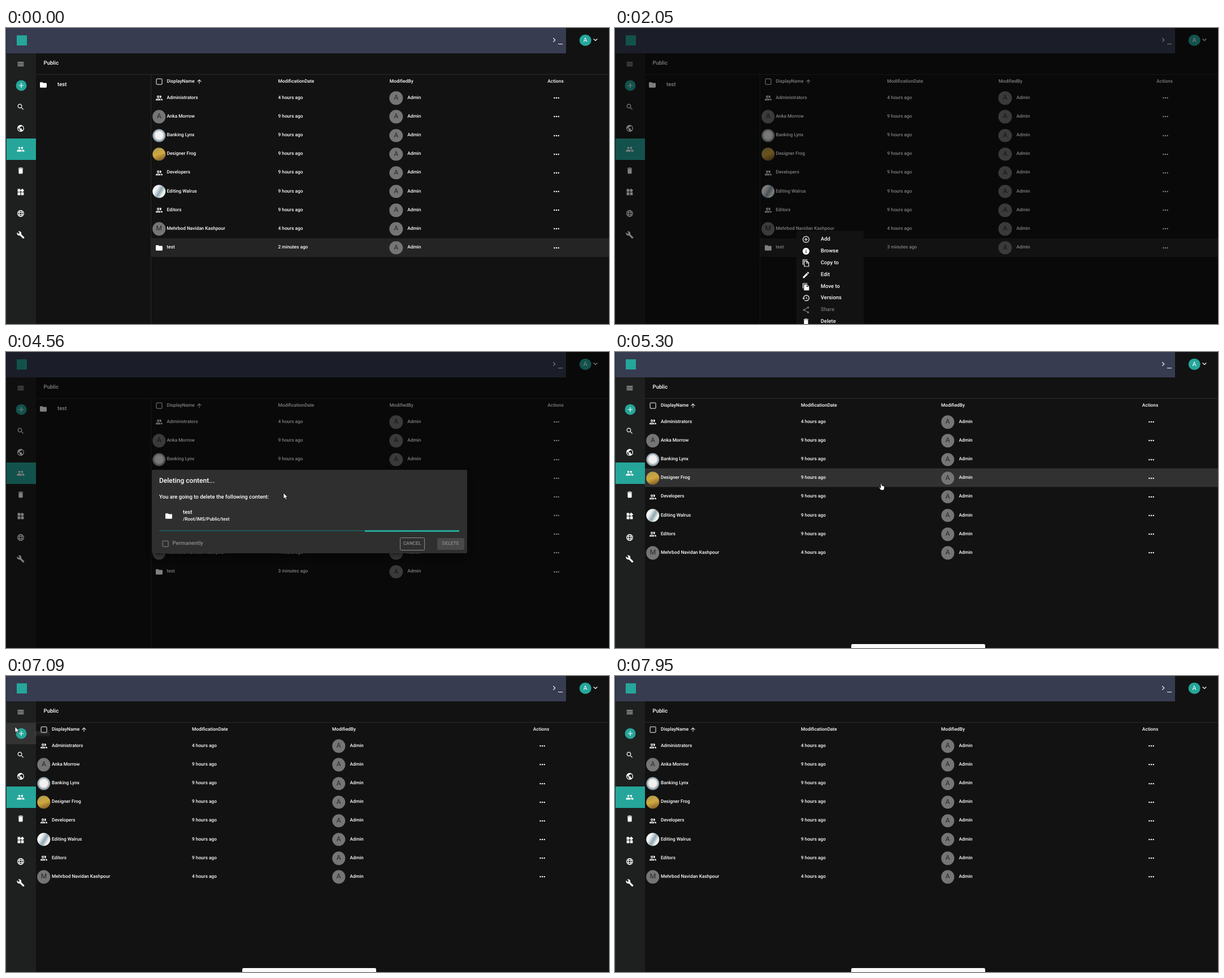
An HTML page for the animation above (8230 ms loop, 1067x525 px).

```html
<!DOCTYPE html>
<html lang="en">
<head>
<meta charset="utf-8">
<title>Deleting a folder</title>
<style>
html, body { margin: 0; width: 100%; height: 100%; overflow: hidden; background: #121212; }
#stage { position: absolute; inset: 0; overflow: hidden; color: #fff;
  font: 500 8.3px Roboto, sans-serif; text-rendering: geometricPrecision; }
#stage div, #stage svg { position: absolute; }
#stage .t { transform: translateY(-50%); line-height: 1; white-space: nowrap; }
.c { transform: translate(-50%, -50%); }
.layer { inset: 0; }
.m { font-size: 9.6px; }
.top { left: 0; top: 0; width: 991px; height: 44.5px; background: #373c51; }
.side { left: 0; top: 44.5px; width: 53px; bottom: 0; background: #1e1f1f; }
.edge { left: 0; top: 0; width: 1px; bottom: 0; background: #17313b; }
.on { left: 1px; top: 196px; width: 52px; height: 38px; background: #26a69a; }
.h { height: 1px; background: #2a2a2a; }
.v { width: 1px; background: #2a2a2a; }
.logo { left: 19px; top: 12.5px; width: 18px; height: 18px; background: #26a69a; }
.av { width: 23.4px; height: 23.4px; border-radius: 50%; background: #757575; color: #262626;
  font-size: 12px; font-weight: 400; line-height: 23.6px; text-align: center; }
.av.me { width: 20.6px; height: 20.6px; background: #26a69a; color: #fff; font-size: 11px; line-height: 20.8px; }
.av.lynx { background: radial-gradient(circle at 50% 48%, #f3f1ef 40%, #8fa0ac 62%, #5f7787); }
.av.frog { background: linear-gradient(160deg, #a59a55, #d2a83f 50%, #6b4a25); }
.av.walrus { background: linear-gradient(120deg, #f4f6f6 30%, #8fa6b0 55%, #eef1f1 75%); }
.plus { width: 19px; height: 19px; border-radius: 50%; background: #26a69a; }
.box { width: 8.8px; height: 8.8px; border: 1.2px solid; border-radius: 1.5px; }

.mark { left: 257px; right: 0; top: 372.6px; height: 33px; background: #242424; }
.hover { left: 53px; right: 0; top: 107.2px; height: 33px; background: #313131; }
.add { left: 1px; top: 83px; width: 52px; height: 38px; background: #333; }
.tip { left: 50px; top: 96.5px; width: 28px; height: 10.5px; border-radius: 2px; background: #616161;
  font-size: 6px; line-height: 10.5px; text-align: center; }
.shade { inset: 0; background: rgba(0, 0, 0, .5); }
.snack { left: 418px; top: 518px; width: 237px; height: 29px; border-radius: 2.5px; background: #fafafa; }
.menu { left: 321px; top: 360px; width: 118.5px; height: 176px; border-radius: 2px; background: #131313;
  transform-origin: 0 20px; font-size: 9.4px; }
.item { left: 0; top: 25px; width: 100%; height: 21px; background: #2a2a2a; }
.dialog { left: 257.5px; top: 209px; width: 558.5px; height: 147.5px; border-radius: 2px; background: #2f2f2f;
  box-shadow: 0 6px 12px rgba(0, 0, 0, .4); overflow: hidden; }
.foot { left: 0; right: 0; bottom: 0; height: 33px; }
.btn { top: 6px; height: 21px; border-radius: 2.5px; line-height: 21px; text-align: center; font-size: 8.4px; }
.cancel { left: 439.5px; width: 41.5px; border: 1px solid; top: 5px; }
.del { left: 505px; width: 48.5px; background: #26a69a; }
.track { left: 13.5px; top: 107px; width: 531px; height: 2.5px; background: #1c5853; overflow: hidden; }
.track div { top: 0; bottom: 0; background: #26a69a; }

#stage [class*="k-"] { animation: 8.23s linear infinite; }
#stage .k-old { animation-name: old; }
#stage .k-new { animation-name: new; }
#stage .k-two { animation-name: two; }
#stage .k-three { animation-name: three; }
#stage .k-mark { animation-name: mark; }
#stage .k-hover { animation-name: hover; }
#stage .k-add { animation-name: add; }
#stage .k-tip { animation-name: tip; }
#stage .k-shade { animation-name: shade; }
#stage .k-snack { animation-name: snack; }
#stage .k-menu { animation-name: menu; }
#stage .k-item { animation-name: item; }
#stage .k-dialog { animation-name: dialog, grow; }
#stage .k-busy { animation-name: busy; }
#stage .k-dim { animation-name: dim; }
#stage .k-del { animation-name: del; }
#stage .k-bar1 { animation-name: bar1; }
#stage .k-bar2 { animation-name: bar2; }
#stage .k-move { animation-name: move; }
#stage .k-arrow { animation-name: arrow; }
#stage .k-hand { animation-name: hand; }

/* hard switches */
@keyframes old { 0% { opacity: 1; animation-timing-function: step-end } 57.1%, 100% { opacity: 0 } }
@keyframes new { 0% { opacity: 0; animation-timing-function: step-end } 57.1%, 100% { opacity: 1 } }
@keyframes two { 0% { opacity: 1; animation-timing-function: step-end } 8.5%, 100% { opacity: 0 } }
@keyframes three { 0% { opacity: 0; animation-timing-function: step-end } 8.5%, 100% { opacity: 1 } }
@keyframes mark { 0% { opacity: 1; animation-timing-function: step-end } 54.7%, 100% { opacity: 0 } }
@keyframes busy { 0% { opacity: 0; animation-timing-function: step-end } 42.02%, 100% { opacity: 1 } }
@keyframes dim { 0% { color: #fff; animation-timing-function: step-end } 42.02%, 100% { color: #8c8c8c } }
@keyframes grow {
  0% { top: 210.5px; height: 144.5px; animation-timing-function: step-end }
  42.02%, 100% { top: 209px; height: 147.5px }
}
@keyframes add {
  0%, 87.2%, 100% { opacity: 0; animation-timing-function: step-end }
  83.77% { opacity: 1; animation-timing-function: step-end }
}
@keyframes arrow {
  0%, 9.6%, 83.77%, 92.77%, 100% { opacity: 1; animation-timing-function: step-end }
  7.2%, 59.17%, 87.2% { opacity: 0; animation-timing-function: step-end }
}
@keyframes hand {
  0%, 9.6%, 83.77%, 92.77%, 100% { opacity: 0; animation-timing-function: step-end }
  7.2%, 59.17%, 87.2% { opacity: 1; animation-timing-function: step-end }
}
@keyframes hover {
  0%, 83.63%, 92.77%, 100% { opacity: 0; transform: none; animation-timing-function: step-end }
  59.17%, 89.31% { opacity: 1; transform: translateY(99.45px); animation-timing-function: step-end }
  81.01%, 88.61% { opacity: 1; transform: translateY(66.3px); animation-timing-function: step-end }
  81.9%, 87.92% { opacity: 1; transform: translateY(33.15px); animation-timing-function: step-end }
  82.77%, 87.23% { opacity: 1; transform: none; animation-timing-function: step-end }
  90% { opacity: 1; transform: translateY(132.6px); animation-timing-function: step-end }
  90.69% { opacity: 1; transform: translateY(165.75px); animation-timing-function: step-end }
  91.39% { opacity: 1; transform: translateY(198.9px); animation-timing-function: step-end }
  92.08% { opacity: 1; transform: translateY(232.05px); animation-timing-function: step-end }
}
@keyframes item {
  0%, 19.37%, 21.51%, 100% { opacity: 0; transform: none; animation-timing-function: step-end }
  14.09% { opacity: 1; transform: none; animation-timing-function: step-end }
  14.87% { opacity: 1; transform: translateY(21px); animation-timing-function: step-end }
  16% { opacity: 1; transform: translateY(42px); animation-timing-function: step-end }
  17.12% { opacity: 1; transform: translateY(63px); animation-timing-function: step-end }
  18.25% { opacity: 1; transform: translateY(84px); animation-timing-function: step-end }
  20.49% { opacity: 1; transform: translateY(126px); animation-timing-function: step-end }
}

/* fades */
@keyframes shade {
  0%, 9.48% { opacity: 0; animation-timing-function: ease-in-out }
  12.21%, 56.5% { opacity: 1; animation-timing-function: ease-in-out }
  58.87%, 100% { opacity: 0 }
}
@keyframes menu {
  0%, 9.48% { opacity: 0; transform: scale(.75, .56); animation-timing-function: ease-in-out }
  12.21%, 24.91% { opacity: 1; transform: none; animation-timing-function: ease-in-out }
  27.3%, 100% { opacity: 0; transform: scale(.75, .56) }
}
@keyframes dialog {
  0%, 24.91% { opacity: 0; animation-timing-function: ease-in-out }
  27.64%, 56.5% { opacity: 1; animation-timing-function: ease-in-out }
  58.87%, 100% { opacity: 0 }
}
@keyframes snack {
  0%, 57.72% { opacity: 0; transform: scale(.75, .56); animation-timing-function: ease-in-out }
  60.45%, 100% { opacity: 1; transform: none }
}
@keyframes tip { 0%, 85.8% { opacity: 0 } 87% { opacity: .5 } 89.1%, 100% { opacity: 0 } }
@keyframes del {
  0%, 37.7% { background: #26a69a; color: #fff }
  38.64%, 42% { background: #0b8574; color: #fff }
  42.02% { background: #0b8574; color: #8c8c8c }
  45.08%, 100% { background: #484848; color: #8c8c8c }
}
@keyframes bar1 {
  0%, 42.02% { left: -35%; right: 100%; animation-timing-function: cubic-bezier(.65, .815, .735, .395) }
  57.33%, 100% { left: 100%; right: -90% }
}
@keyframes bar2 {
  0%, 55.99% { left: -200%; right: 100%; animation-timing-function: cubic-bezier(.165, .84, .44, 1) }
  71.3%, 100% { left: 107%; right: -8% }
}
@keyframes move {
  0%, 3.16% { transform: translate(306px, 530px); animation-timing-function: ease-out }
  9.11%, 13.49% { transform: translate(319px, 380px) }
  21.51%, 24.91% { transform: translate(345px, 530px); animation-timing-function: ease-in }
  27.95% { transform: translate(450px, 300px) }
  30.62% { transform: translate(560px, 194px) }
  34.75%, 35.12% { transform: translate(642px, 411px); animation-timing-function: ease-out }
  38.64%, 42.77% { transform: translate(799px, 338px) }
  45.2% { transform: translate(740px, 427px) }
  48.6% { transform: translate(600px, 290px) }
  50.79% { transform: translate(520px, 187px); animation-timing-function: ease-out }
  53.46%, 55.89% { transform: translate(491px, 250px) }
  59.54%, 80.19% { transform: translate(471px, 233px) }
  84.08%, 86.88% { transform: translate(16px, 90px) }
  95.87% { transform: translate(1031px, 520px) }
  96.6%, 100% { transform: translate(1036px, 530px) }
}
</style>
</head>
<body>
<div id="stage"></div>
<script>
const line = 'fill="none" stroke="currentColor" stroke-width="2"';
const disc = 'M12 2C6.48 2 2 6.48 2 12s4.48 10 10 10 10-4.48 10-10S17.52 2 12 2z';
const shapes = {
  menu: 'M3 18h18v-2H3v2zm0-5h18v-2H3v2zm0-7v2h18V6H3z',
  plus: 'M19 13h-6v6h-2v-6H5v-2h6V5h2v6h6v2z',
  search: 'M15.5 14h-.79l-.28-.27C15.41 12.59 16 11.11 16 9.5 16 5.91 13.09 3 9.5 3S3 5.91 3 9.5 5.91 16 9.5 16c1.61 0 3.09-.59 4.23-1.57l.27.28v.79l5 4.99L20.49 19l-4.99-5zm-6 0C7.01 14 5 11.99 5 9.5S7.01 5 9.5 5 14 7.01 14 9.5 11.99 14 9.5 14z',
  earth: disc + 'm-1 17.93c-3.95-.49-7-3.85-7-7.93 0-.62.08-1.21.21-1.79L9 15v1c0 1.1.9 2 2 2v1.93zm6.9-2.54c-.26-.81-1-1.39-1.9-1.39h-1v-3c0-.55-.45-1-1-1H8v-2h2c.55 0 1-.45 1-1V7h2c1.1 0 2-.9 2-2v-.41c2.93 1.19 5 4.06 5 7.41 0 2.08-.8 3.97-2.1 5.39z',
  people: 'M16 11c1.66 0 3-1.34 3-3s-1.34-3-3-3-3 1.34-3 3 1.34 3 3 3zm-8 0c1.66 0 3-1.34 3-3S9.66 5 8 5 5 6.34 5 8s1.34 3 3 3zm0 2c-2.33 0-7 1.17-7 3.5V19h14v-2.5c0-2.33-4.67-3.5-7-3.5zm8 0c-.29 0-.62.02-.97.05 1.16.84 1.97 1.97 1.97 3.45V19h6v-2.5c0-2.33-4.67-3.5-7-3.5z',
  group: 'M9 13.75c-2.34 0-7 1.17-7 3.5V19h14v-1.75c0-2.33-4.66-3.5-7-3.5zM4.34 17c.84-.58 2.87-1.25 4.66-1.25s3.82.67 4.66 1.25H4.34zM9 12c1.93 0 3.5-1.57 3.5-3.5S10.93 5 9 5 5.5 6.57 5.5 8.5 7.07 12 9 12zm0-5c.83 0 1.5.67 1.5 1.5S9.83 10 9 10s-1.5-.67-1.5-1.5S8.17 7 9 7zm7.04 6.81c1.16.84 1.96 1.96 1.96 3.44V19h4v-1.75c0-2.02-3.5-3.17-5.96-3.44zM15 12c1.93 0 3.5-1.57 3.5-3.5S16.93 5 15 5c-.54 0-1.04.13-1.5.35.63.89 1 1.98 1 3.15s-.37 2.26-1 3.15c.46.22.96.35 1.5.35z',
  trash: 'M6 19c0 1.1.9 2 2 2h8c1.1 0 2-.9 2-2V7H6v12zM19 4h-3.5l-1-1h-5l-1 1H5v2h14V4z',
  widgets: 'M13 13v8h8v-8h-8zM3 21h8v-8H3v8zM3 3v8h8V3H3zm13.66-1.31L11 7.34 16.66 13l5.66-5.66-5.66-5.65z',
  globe: `<g ${line}><circle cx="12" cy="12" r="9"/><ellipse cx="12" cy="12" rx="4" ry="9"/><path d="M4 9h16M4 15h16"/></g>`,
  wrench: 'M22.7 19l-9.1-9.1c.9-2.3.4-5-1.5-6.9-2-2-5-2.4-7.4-1.3L9 6 6 9 1.6 4.7C.4 7.1.9 10.1 2.9 12.1c1.9 1.9 4.6 2.4 6.9 1.5l9.1 9.1c.4.4 1 .4 1.4 0l2.3-2.3c.5-.4.5-1.1.1-1.4z',
  folder: 'M10 4H4c-1.1 0-2 .9-2 2v12c0 1.1.9 2 2 2h16c1.1 0 2-.9 2-2V8c0-1.1-.9-2-2-2h-8l-2-2z',
  up: 'M4 12l1.41 1.41L11 7.83V20h2V7.83l5.58 5.59L20 12l-8-8-8 8z',
  right: `<path ${line} d="M9 6.7l6 5.7-6 5.7"/>`,
  down: `<path ${line} d="M6.5 9l5.5 5.5L17.5 9"/>`,
  dots: '<circle cx="6" cy="12" r="2"/><circle cx="12" cy="12" r="2"/><circle cx="18" cy="12" r="2"/>',
  ring: `<g ${line}><circle cx="12" cy="12" r="9"/><path d="M12 7v10M7 12h10"/></g>`,
  info: disc + 'm1 15h-2v-6h2v6zm0-8h-2V7h2v2z',
  copy: `<path ${line} d="M3 17V2h13M7 6h8l5 5v11H7zM14 6v6h6"/>`,
  pen: 'M3 17.25V21h3.75L17.81 9.94l-3.75-3.75L3 17.25zM20.71 7.04c.39-.39.39-1.02 0-1.41l-2.34-2.34c-.39-.39-1.02-.39-1.41 0l-1.83 1.83 3.75 3.75 1.83-1.83z',
  pages: 'M16 1H4c-1.1 0-2 .9-2 2v14h2V3h12V1zm-1 4l6 6v10c0 1.1-.9 2-2 2H8c-1.1 0-2-.9-2-2V7c0-1.1.9-2 2-2h7zm-1 7h5.5L14 6.5V12z',
  clock: 'M13 3c-4.97 0-9 4.03-9 9H1l3.89 3.89.07.14L9 12H6c0-3.87 3.13-7 7-7s7 3.13 7 7-3.13 7-7 7c-1.93 0-3.68-.79-4.94-2.06l-1.42 1.42C8.27 19.99 10.51 21 13 21c4.97 0 9-4.03 9-9s-4.03-9-9-9zm-1 5v5l4.28 2.54.72-1.21-3.5-2.08V8H12z',
  share: `<circle cx="18" cy="5" r="3"/><circle cx="6" cy="12" r="3"/><circle cx="18" cy="19" r="3"/><path ${line} d="M18 5L6 12l12 7"/>`
};

const icon = (name, x, y, size = 14.4) => {
  const s = shapes[name];
  return `<svg class="c" style="left:${x}px;top:${y}px" width="${size}" height="${size}" viewBox="0 0 24 24" fill="currentColor" fill-rule="evenodd">${s[0] === '<' ? s : `<path d="${s}"/>`}</svg>`;
};
const put = (cls, x, y, html = '') => `<div class="${cls}" style="left:${x}px;top:${y}px">${html}</div>`;
const text = (s, x, y, cls = '') => put('t ' + cls, x, y, s);
const avatar = (letter, x, y, cls = '') => put('av c ' + cls, x, y, letter);
const block = (cls, html = '') => `<div class="${cls}">${html}</div>`;

const rows = [
  ['Administrators', 4, 'group'],
  ['Anka Morrow', 9, 'A'],
  ['Banking Lynx', 9, 'lynx'],
  ['Designer Frog', 9, 'frog'],
  ['Developers', 9, 'group'],
  ['Editing Walrus', 9, 'walrus'],
  ['Editors', 9, 'group'],
  ['Mehrbod Navidan Kashpour', 4, 'M'],
  ['test', 0, 'folder']
];

function badge(kind, x, y) {
  if (shapes[kind]) return icon(kind, x, y);
  return kind.length === 1 ? avatar(kind, x, y) : avatar('', x, y, kind);
}

// x holds the columns: badge, name, date, editor, actions
function list(count, x) {
  const [b, n, d, e, a] = x;
  const head = put('box c', b, 95) + text('DisplayName', n, 94.5) + icon('up', n + 57, 95, 11.5) +
    text('ModificationDate', d, 94.5) + text('ModifiedBy', e, 94.5) + text('Actions', a - 16, 94.5);
  return head + rows.slice(0, count).map(([name, hours, kind], i) => {
    const y = 123.8 + 33.15 * i;
    const date = hours ? text(hours + ' hours ago', d, y)
      : text('2 minutes ago', d, y, 'k-two') + text('3 minutes ago', d, y, 'k-three');
    return badge(kind, b, y + .5) + text(name, n, y) + date +
      avatar('A', e + 11.7, y + .5) + text('Admin', e + 31.5, y) + icon('dots', a, y + .5);
  }).join('');
}

const nav = ['search', 'earth', 'people', 'trash', 'widgets', 'globe', 'wrench']
  .map((n, i) => icon(n, 26.2, 139.8 + 37.8 * i)).join('');

const frame = block('top') + block('side') + block('edge') + block('on') + block('logo') +
  icon('right', 970, 21, 14) + put('h', 976.5, 27.5, '<div style="width:8px;height:1px;background:#fff"></div>') +
  avatar('A', 1025, 21.5, 'me') + icon('down', 1042.5, 21.3) +
  text('Public', 66.5, 63.2, 'm') +
  '<div class="h" style="left:53px;right:0;top:82px"></div>' +
  block('add k-add') + icon('menu', 26.2, 64) + put('plus c', 26.7, 102) + icon('plus', 26.7, 102) + nav;

const before = block('layer k-old',
  '<div class="v" style="left:256px;top:83px;bottom:0"></div>' + block('mark k-mark') +
  icon('folder', 65.8, 101) + text('test', 91, 101, 'm') + list(9, [270.8, 284.5, 481.5, 678.7, 974.3]));
const after = block('layer k-new', block('hover k-hover') + list(8, [67, 81, 329, 577, 948.8]));

const choices = [['Add', 'ring'], ['Browse', 'info'], ['Copy to', 'copy'], ['Edit', 'pen'], ['Move to', 'pages'],
  ['Versions', 'clock'], ['Share', 'share'], ['Delete', 'trash']];
const menu = block('menu k-menu', block('item k-item') + choices.map(([s, i], k) => {
  const y = 14.7 + 20.95 * k;
  return `<div style="color:${s === 'Share' ? '#777' : '#fff'}">${icon(i, 17, y) + text(s, 43, y)}</div>`;
}).join(''));

const dialog = block('dialog k-dialog',
  text('Deleting content...', 13.5, 19, '" id="title') +
  text('You are going to delete the following content:', 13.5, 48.5, 'm') +
  icon('folder', 30, 81.5) + text('test', 55.5, 75.5, 'm') + text('/Root/IMS/Public/test', 55.5, 88) +
  block('track k-busy', block('k-bar1') + block('k-bar2')) +
  block('foot k-dim', put('box c', 24.7, 16.7) + text('Permanently', 37, 16.5, 'm') +
    block('btn cancel', 'CANCEL') + block('btn del k-del', 'DELETE')));

const pen = 'fill="#fff" stroke="#000" stroke-width=".7" stroke-linejoin="round"';
const pointer = block('k-move" style="left:0;top:0',
  `<svg class="k-arrow" width="12" height="16" style="left:0;top:0;overflow:visible"><path ${pen} d="M0 0v10.3l2.4-2.2 1.6 3.7 1.8-.8-1.6-3.5h3.2z"/></svg>` +
  `<svg class="k-hand" width="12" height="16" style="left:0;top:0;overflow:visible"><path ${pen} d="M-1 .8Q0-.6 1 .8V4Q2 3.400 2.700 4.400 3.700 3.900 4.200 4.900 5.600 4.700 5.600 6V9L4.500 12H-.6L-3.600 7.800Q-3.700 6.400-2.400 6.900L-1 8.200z"/></svg>`);

document.getElementById('stage').innerHTML = frame + before + after +
  block('tip k-tip', 'Add new') + block('snack k-snack') + block('shade k-shade') + menu + dialog + pointer;
document.getElementById('title').style.fontSize = '12px';
</script>
</body>
</html>
```
